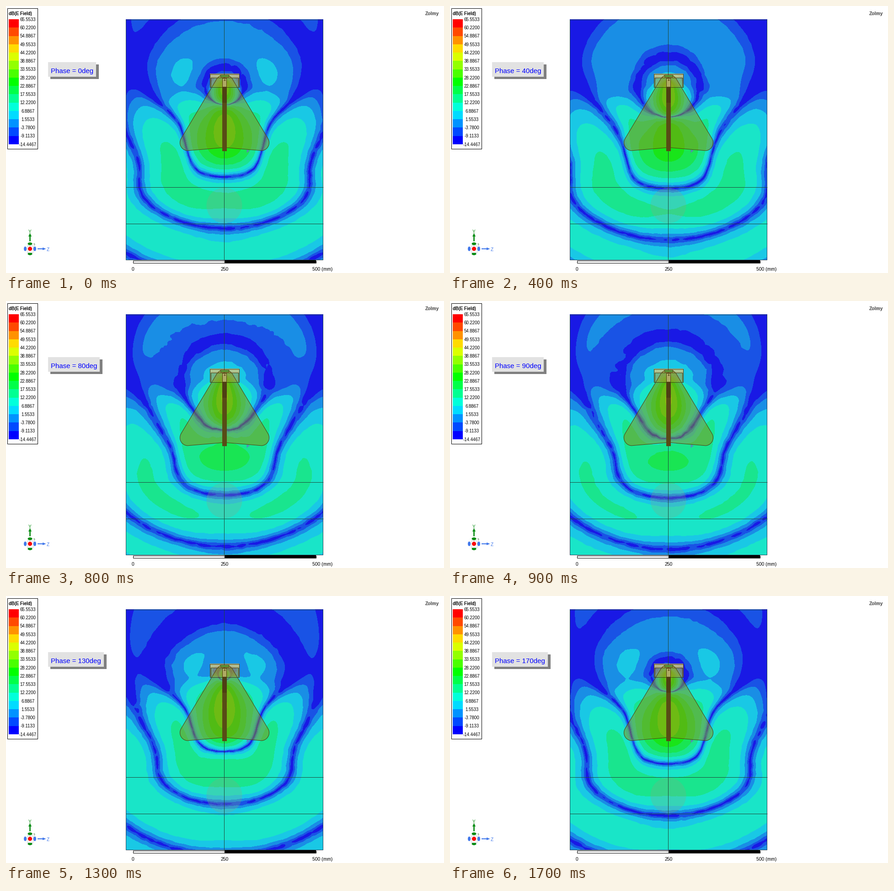
A matplotlib script that plays this animation: 958x585 px, repeating every 1.8 s.

```python
import numpy as np
import matplotlib.pyplot as plt
from matplotlib.animation import FuncAnimation
from matplotlib.patches import Circle, Ellipse, Polygon, Rectangle

W, H, DPI = 958, 585, 100
LEFT, RIGHT, TOP, BOTTOM, MID, FEED = 262, 694, 29, 556, 478, 160
LOW, STEP, BANDS = -14.44667, 80 / 15, 15
FRAMES = 18

ramp = np.linspace(0, 4, BANDS)
BAND_RGB = np.clip(np.column_stack([ramp - 2, np.minimum(ramp, 4 - ramp), 2 - ramp]), 0, 1)
FIELD_RGB = .8 * BAND_RGB + .1


def sigmoid(x):
    return 1 / (1 + np.exp(-x))


def bell(x):
    return np.exp(-x * x)


def phase_map(dx, y, r, angle):
    """Phase in degrees: slow near the feed, free-space speed further out."""
    radial = 1.6 * r - 164 + 75 * sigmoid((132 - r) / 18)
    backward = 25 * (1 - np.cos(np.radians(angle)))
    # the flanks of the beam run ahead of its axis
    flank = 120 * sigmoid((dx - 80) / 12) * sigmoid((y + .6 * dx - 295) / 14) \
        * sigmoid((340 + .2 * dx - y) / 25)
    return radial + backward + flank


def level_map(dx, y, r, angle):
    """Peak level in dB: front lobe, back lobe and the strong field at the feed."""
    front = 14 - 24 * (angle / 84) ** 4 - .04 * np.maximum(r - 290, 0)
    front -= 2 * bell(dx / 60)
    back = 2.5 - .03 * r - 9 * sigmoid((dx - 205) / 9)
    back -= 5 * bell((angle - 86) / 12) * sigmoid((r - 165) / 10)
    back += 3.5 * bell((dx - 95) / 40) * bell((y - 145) / 40)
    width = 15 + .3 * np.maximum(y - FEED, 0)
    near = 23 * sigmoid((178 - r) / 30) * bell(dx / width) * sigmoid((y - FEED) / 5)
    return 2 * np.logaddexp(front / 2, back / 2) + near


def mesh_noise(rng, shape, cell):
    """Random values on a coarse grid, interpolated linearly."""
    h, w = shape
    coarse = rng.uniform(-1, 1, (h // cell + 2, w // cell + 2))
    fy, fx = np.arange(h)[:, None] / cell, np.arange(w)[None, :] / cell
    iy, ix = fy.astype(int), fx.astype(int)
    ty, tx = fy - iy, fx - ix
    upper = coarse[iy, ix] * (1 - tx) + coarse[iy, ix + 1] * tx
    lower = coarse[iy + 1, ix] * (1 - tx) + coarse[iy + 1, ix + 1] * tx
    return upper * (1 - ty) + lower * ty


gx, gy = np.meshgrid(np.arange(LEFT + .5, RIGHT), np.arange(TOP + .5, BOTTOM))
dx = np.abs(gx - MID)
polar = np.hypot(dx, gy - FEED), np.degrees(np.arctan2(dx, gy - FEED))
phase = phase_map(dx, gy, *polar)
level = level_map(dx, gy, *polar)

# The coarse mesh breaks up the cores of the nulls
rng = np.random.default_rng(4)
phase += 1.5 * mesh_noise(rng, phase.shape, 9)
residue = 10 ** ((-11 + 5 * mesh_noise(rng, phase.shape, 11)) / 20)
residue *= np.clip((level + 4) / 8, 0, 1)
peak = 10 ** (level / 20)


def field(theta):
    wave = peak * np.sin(np.radians(phase - theta))
    db = 10 * np.log10(wave ** 2 + residue ** 2 + 1e-6)
    band = np.clip((db - LOW) // STEP, 0, BANDS - 1).astype(int)
    return FIELD_RGB[band]


fig = plt.figure(figsize=(W / DPI, H / DPI), dpi=DPI, facecolor="white")
ax = fig.add_axes([0, 0, 1, 1])
ax.set_axis_off()


def rgb(r, g, b, a=255):
    return r / 255, g / 255, b / 255, a / 255


def text(x, y, s, size, color="black", **kw):
    return ax.text(x, y, s, fontsize=size * 72 / DPI, color=color,
                   family="Liberation Sans", va="baseline", **kw)


def rect(x0, y0, x1, y1, fill="none", edge="none", z=3):
    return ax.add_patch(Rectangle((x0, y0), x1 - x0, y1 - y0, fc=fill, ec=edge,
                                  lw=.72, zorder=z))


def line(xs, ys, color, lw=.72, z=4):
    ax.plot(xs, ys, color=color, lw=lw, zorder=z, solid_capstyle="butt")


def shape(points, fill, edge="none", z=5):
    ax.add_patch(Polygon(points, fc=fill, ec=edge, lw=.72, zorder=z))


def oval(x, y, w, h, fill, z=3):
    ax.add_patch(Ellipse((x, y), w, h, fc=fill, ec="none", zorder=z))


def draw_legend():
    rect(3, 5, 69, 313, "white", "black")
    text(6.5, 20, "dB(E Field)", 9.7, weight="bold")
    pitch = 274 / BANDS
    for i in range(BANDS):
        y = 29 + i * pitch
        rect(6, y, 28, y + pitch, BAND_RGB[BANDS - 1 - i])
    for i in range(BANDS + 1):
        value = LOW + STEP * (BANDS - i)
        text(48, 32.7 + i * pitch, f"{value:.4f}", 9.7, ha="center")


def draw_antenna():
    dark = rgb(80, 62, 18)
    # right half: straight flank, rounded corner, shallow notch at the bar
    turn = np.radians(np.linspace(-30, 85, 12))
    corner = [(80 + 17.5 * np.cos(a), 299.5 + 17.5 * np.sin(a)) for a in turn]
    half = [(9, 152), (16, 158)] + corner + [(0, 310)]
    outline = [(MID + x, y) for x, y in half]
    outline += [(MID - x, y) for x, y in half[-2::-1]]
    shape(outline, rgb(140, 145, 15, 125), dark, 4)
    rect(446, 148, 510, 157, rgb(200, 195, 130, 220))
    rect(446, 157, 510, 177, rgb(175, 165, 70, 150))
    rect(446, 149, 510, 178, edge=dark, z=5)
    rect(448, 157, 508, 178, edge=dark, z=5)
    rect(469, 151, 487, 155, rgb(90, 165, 60), dark, z=5)
    rect(473, 177, 483, 318, rgb(88, 76, 22), z=6)
    rect(473, 177, 483, 212, rgb(78, 62, 20), z=6)
    rect(473, 158, 482, 177, rgb(175, 170, 100), dark, z=6)
    line([476, 480], [162, 162], dark, z=7)
    line([478, 478], [159, 164], dark, z=7)


def draw_plot_frame():
    ink = rgb(30, 75, 60)
    ax.add_patch(Circle((477.5, 437), 39, fc=rgb(140, 165, 130, 65), ec="none", zorder=3))
    for y in (397, 477):
        line([LEFT, RIGHT], [y, y], ink)
    line([477, 477], [TOP, BOTTOM], ink)
    rect(LEFT, TOP + 1, RIGHT - 1, BOTTOM, edge=rgb(35, 70, 90), z=5)
    purple = rgb(105, 110, 200)
    line([527, 527], [315, 321], purple, 1)
    line([527, 532, 527], [315.5, 317.5, 319], purple, .8)


def draw_scale():
    rect(278, 558, 678, 563, "white", "black", z=6)
    rect(478, 557, 678, 563, "black", z=7)
    for x, s in ((278, "0"), (478, "250"), (692, "500 (mm)")):
        text(x, 580.5, s, 10.3, ha="center")


def draw_triad():
    green, blue = rgb(10, 140, 20), rgb(65, 120, 235)
    for side in (-1, 1):
        oval(52.5, 532 + 11 * side, 10, 6, green)
        oval(52.5 + 10.5 * side, 532, 6, 10, blue)
    rect(46, 525, 59, 540, "white", rgb(205, 210, 215), z=4)
    oval(52.5, 532, 9.2, 9.2, rgb(250, 10, 10), z=5)
    line([52.5, 52.5], [515, 503], green, 2)
    shape([(49, 505), (56, 505), (52.5, 497.5)], green)
    line([69, 82], [532, 532], blue, 1.5)
    shape([(80, 529), (80, 535), (87.5, 532)], blue)
    text(52, 497.5, "Y", 10, green, ha="center")
    text(91.5, 537, "Z", 10, blue, ha="center")
    line([60, 62, 63, 62], [522, 520.5, 522, 525], rgb(110, 150, 110))


image = ax.imshow(field(0), extent=(LEFT, RIGHT, BOTTOM, TOP), zorder=1,
                  interpolation="nearest", aspect="auto")
ax.set_xlim(0, W)
ax.set_ylim(H, 0)
draw_legend()
draw_plot_frame()
draw_antenna()
draw_scale()
draw_triad()
text(917, 20.5, "Zolmy", 10.4, rgb(64, 64, 64), weight="bold")

shadow = rect(97, 128, 203, 159.5, rgb(128, 128, 128))
panel = rect(92, 123, 197, 154.5, rgb(226, 226, 226), z=4)
label = text(98.5, 147, "", 15, "blue", zorder=5)


def update(i):
    theta = 10 * i
    image.set_data(field(theta))
    right = 197 + 8.4 * (len(str(theta)) - 1)
    panel.set_width(right - 92)
    shadow.set_width(right + 6 - 97)
    label.set_text(f"Phase = {theta}deg")
    return image, panel, shadow, label


anim = FuncAnimation(fig, update, frames=FRAMES, interval=100, repeat=True,
                     repeat_delay=0, init_func=lambda: update(0))
plt.show()
```
